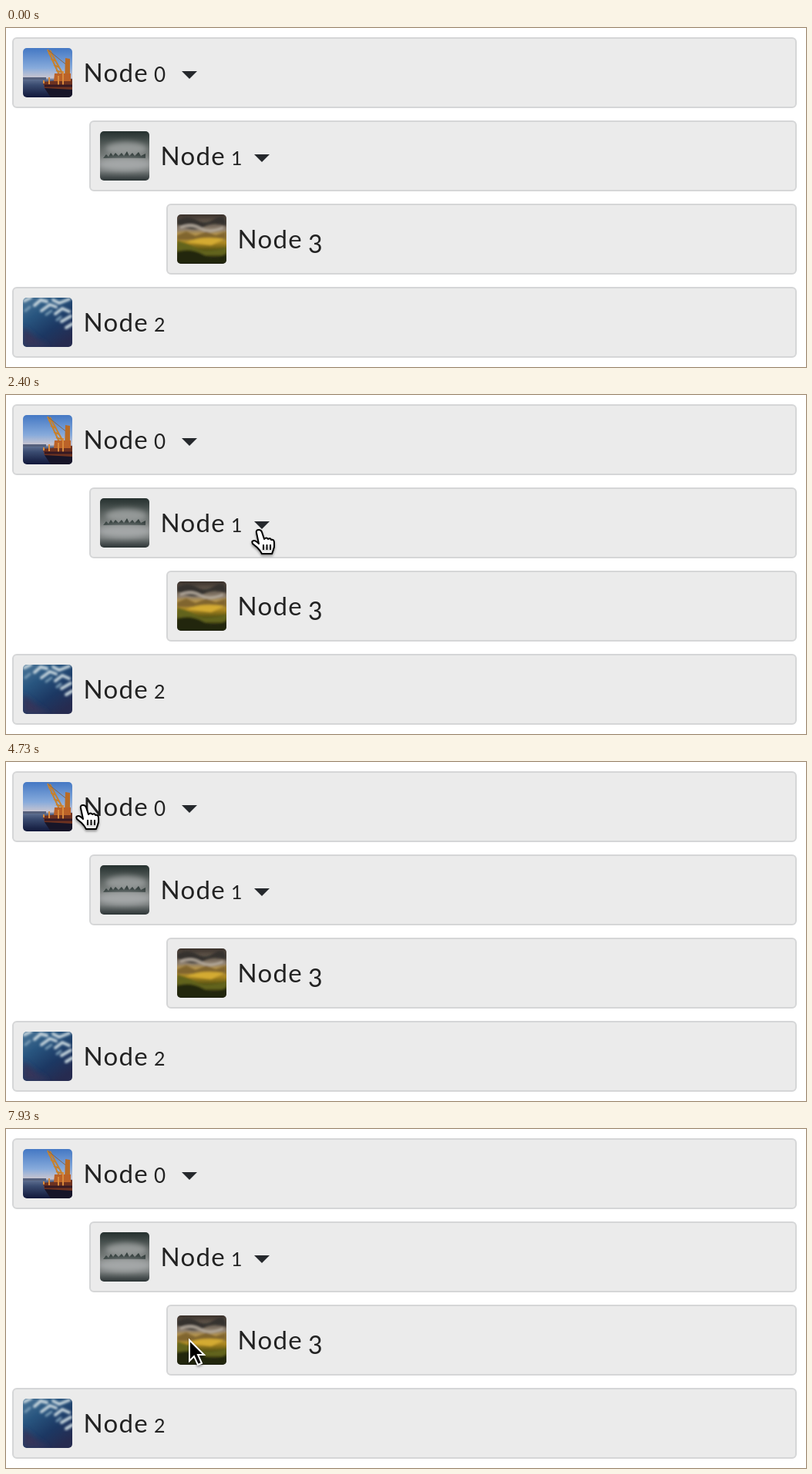
An HTML page that plays this animation: 1038 by 440 pixels, repeating every 8000 ms.

```html
<!DOCTYPE html>
<html lang="en">
<head>
<meta charset="utf-8">
<title>Node tree</title>
<style>
  html, body { margin: 0; width: 100%; height: 100%; overflow: hidden; background: #fff; }
  svg { display: block; }
  .row rect.card { fill: #ebebeb; stroke: #d5d6d7; stroke-width: 2; }
  .name { font: 33px Lato, "Open Sans", sans-serif; letter-spacing: 1.3px; fill: #222; }
  .caret { fill: #25282c; }
  .tip rect { fill: #ececec; stroke: #c4c4c4; filter: drop-shadow(0 2px 3px #0005); }
  .tip text { font: 22px Inter, Roboto, sans-serif; fill: #111; }
  #cursor path { filter: drop-shadow(0 2px 1.5px #0006); }
</style>
</head>
<body>
<svg id="stage" width="1038" height="440" viewBox="0 0 1038 440">
  <defs>
    <clipPath id="thumb"><rect width="64" height="64" rx="5"/></clipPath>
    <filter id="soft"><feGaussianBlur stdDeviation="1.6"/></filter>
    <filter id="fog" x="-30%" y="-50%" width="160%" height="200%"><feGaussianBlur stdDeviation="3.5"/></filter>
    <filter id="edge"><feGaussianBlur stdDeviation=".5"/></filter>

    <linearGradient id="dusk" x2="0" y2="1">
      <stop stop-color="#4478c4"/><stop offset=".4" stop-color="#86aadb"/>
      <stop offset=".6" stop-color="#c8c5d0"/><stop offset=".65" stop-color="#596a8c"/>
      <stop offset=".75" stop-color="#3a4b70"/><stop offset="1" stop-color="#10173a"/>
    </linearGradient>
    <linearGradient id="mist" x2="0" y2="1">
      <stop stop-color="#25302e"/><stop offset=".3" stop-color="#59605e"/>
      <stop offset=".6" stop-color="#858988"/><stop offset=".8" stop-color="#777c7c"/>
      <stop offset="1" stop-color="#2c3435"/>
    </linearGradient>
    <linearGradient id="sea" x2=".7" y2="1">
      <stop stop-color="#4d7799"/><stop offset=".35" stop-color="#28557f"/>
      <stop offset=".7" stop-color="#1c3863"/><stop offset="1" stop-color="#262b50"/>
    </linearGradient>
    <linearGradient id="valley" x2="0" y2="1">
      <stop stop-color="#3a312b"/><stop offset=".3" stop-color="#8b7d6c"/>
      <stop offset=".4" stop-color="#b49450"/><stop offset=".58" stop-color="#a88520"/>
      <stop offset=".75" stop-color="#4c4b12"/><stop offset="1" stop-color="#14180a"/>
    </linearGradient>

    <g id="crane" clip-path="url(#thumb)">
      <rect width="64" height="64" fill="url(#dusk)"/>
      <path d="M0 38H30V41H0Z" fill="#55607c"/>
      <g filter="url(#edge)">
        <path d="M28 52H64V64H36Z" fill="#171528"/>
        <path d="M26 44L64 40V54L28 52Z" fill="#6e3220"/>
        <path d="M32 2L48 37M35 3L53 36M33 7L38 8M36 14L43 17M40 22L47 25M43 29L51 32" fill="none" stroke="#c6812d" stroke-width="2"/>
        <path d="M33 3L58 23" stroke="#866347"/>
        <path d="M55 13L61 14V42H54Z" fill="#b86b26"/>
        <path d="M41 33H62V43H40Z" fill="#bb6228"/>
        <path d="M27 42V46M34 38V47M46 36V48M52 30V49" stroke="#d98a3c" stroke-width="2"/>
        <path d="M28 49H64" stroke="#351923" stroke-width="3"/>
      </g>
    </g>
    <g id="forest" clip-path="url(#thumb)">
      <rect width="64" height="64" fill="url(#mist)"/>
      <ellipse cx="34" cy="23" rx="27" ry="9" fill="#949998" filter="url(#fog)"/>
      <path d="M4 35L8 30L11 33L14 28L17 32L20 28L24 32L28 28L31 32L35 26L38 32L42 28L45 32L50 27L53 32L59 29V35Z" fill="#35403e" filter="url(#edge)"/>
      <ellipse cx="32" cy="43" rx="35" ry="8" fill="#a4a7a8" filter="url(#fog)"/>
    </g>
    <g id="waves" clip-path="url(#thumb)">
      <rect width="64" height="64" fill="url(#sea)"/>
      <path d="M0 64V38Q18 54 34 64Z" fill="#36345a" filter="url(#fog)"/>
      <g fill="none" stroke="#c5d4dc" stroke-linecap="round" stroke-width="4" filter="url(#soft)">
        <path d="M2 4L10 0M15 10L23 3L31 5M24 17L35 9L43 12M39 3L47 7L60 2M42 21L51 14L60 18M50 31L62 24M56 39L64 34"/>
        <path d="M3 17L9 12M30 22L37 17M44 29L49 25" stroke="#7b9db5" stroke-width="3"/>
      </g>
    </g>
    <g id="hills" clip-path="url(#thumb)">
      <rect width="64" height="64" fill="url(#valley)"/>
      <g filter="url(#soft)">
        <path d="M0 7Q14 0 25 7T48 6T64 9V15Q47 9 35 16T0 13Z" fill="#35302d"/>
        <path d="M4 17Q18 11 30 18T60 17" fill="none" stroke="#b7ada0" stroke-width="3"/>
        <path d="M0 27L12 22L24 28L38 22L50 27L64 22V33H0Z" fill="#80652d"/>
        <path d="M12 36Q32 27 62 32L44 40Z" fill="#d4ab32"/>
        <path d="M0 34Q14 38 25 44T64 43V53H0Z" fill="#62631a"/>
        <path d="M0 48Q18 43 34 52T64 50V64H0Z" fill="#20250c"/>
      </g>
    </g>
  </defs>
  <g id="rows"></g>
  <g class="tip" id="tip">
    <rect x=".5" y=".5" width="177" height="34"/>
    <text x="6" y="26">Random Picture</text>
  </g>
  <g id="cursor">
    <g id="hand">
      <path d="M-3 4Q-4 0 0 0Q3 0 4 3L7 12Q10 9 12 12Q15 10 16 13Q20 12 20 17V22Q19 26 17 31H4Q2 27 -2 23L-8 18Q-10 14 -6 14Q-4 14 0 18Z" fill="#fff" stroke="#000" stroke-width="2" stroke-linejoin="round"/>
      <path d="M6 19V26M10.5 19V26M15 19V26" stroke="#000" stroke-width="1.8"/>
    </g>
    <path id="arrow" d="M1 2V29L7 23L12 34L17 32L12 21H20Z" fill="#000" stroke="#fff" stroke-width="2"/>
  </g>
  <circle id="press" r="61" cx="228.5" cy="62" fill="none" stroke="#000" stroke-width="2.6"/>
</svg>
<script>
const LOOP = 8000;
const $ = id => document.getElementById(id);
const show = (el, on) => el.setAttribute('display', on ? 'inline' : 'none');
const place = (el, x, y) => el.setAttribute('transform', `translate(${x} ${y})`);
const within = (t, spans) => spans.some(([from, to]) => t >= from && t < to);

// Old-style figures: size and drop below the baseline
const nodes = [
  { label: 0, x: 8, pic: 'crane', size: 26, drop: 0, caret: 230 },
  { label: 1, x: 108, pic: 'forest', size: 25, drop: 0, caret: 224 },
  { label: 3, x: 208, pic: 'hills', size: 32, drop: 6 },
  { label: 2, x: 8, pic: 'waves', size: 25, drop: 0 },
];

$('rows').innerHTML = nodes.map(n => `
  <g class="row">
    <rect class="card" x="1" y="1" width="${1022 - n.x + 8 - 8 + 8 - 6}" height="90" rx="5"/>
    <use href="#${n.pic}" x="14" y="14"/>
    <text class="name" x="92.5" y="58">Node <tspan x="184" dy="${n.drop}" font-size="${n.size}" style="font-size:${n.size}px">${n.label}</tspan></text>
    ${n.caret ? '<path class="caret"/>' : ''}
  </g>`).join('');
nodes.forEach((n, i) => {
  n.el = $('rows').children[i];
  n.arrow = n.el.querySelector('.caret');
});

const closed0 = [[1200, 1960]];
const closed1 = [[2850, 3465]];
const presses = [[1070, 1200], [1850, 1960], [2740, 2850], [3370, 3465]];
const tips = [{ from: 5500, to: 6180, x: 60, y: 92 }, { from: 6800, to: 7450, x: 250, y: 308 }];

// time, x, y of the pointer's hot spot
const route = [
  [380, 262, 17], [700, 231, 62], [1050, 228, 62], [2020, 228, 62],
  [2380, 328, 175], [2700, 330, 176], [3800, 330, 176], [4730, 100, 56],
  [4950, 58, 54], [5850, 58, 54], [6070, 98, 94], [6500, 250, 270],
  [7450, 250, 270], [7700, 237, 272], [LOOP, 237, 272],
];

function pointerAt(t) {
  const i = Math.max(1, route.findIndex(p => p[0] > t));
  const [a, b] = [route[i - 1], route[i]];
  const k = Math.min(1, Math.max(0, (t - a[0]) / (b[0] - a[0])));
  const e = k * k * (3 - 2 * k);
  return [a[1] + (b[1] - a[1]) * e, a[2] + (b[2] - a[2]) * e];
}

function layout(t) {
  const shut0 = within(t, closed0), shut1 = within(t, closed1);
  const hidden = [false, shut0, shut0 || shut1, false];
  let y = 12;
  nodes.forEach((n, i) => {
    show(n.el, !hidden[i]);
    if (hidden[i]) return;
    n.y = y;
    place(n.el, n.x, y);
    if (n.arrow) {
      const shut = i ? shut1 : shut0, c = n.caret;
      n.arrow.setAttribute('d', shut
        ? `M${c - 5} 37V57L${c + 6} 47Z`
        : `M${c - 10} 44H${c + 10}L${c} 54Z`);
    }
    y += 108;
  });
  return nodes.filter((n, i) => !hidden[i]);
}

function draw(t) {
  const visible = layout(t);
  const [x, y] = pointerAt(t);
  const overName = visible.some(n => n.caret && x > n.x + 80 && x < n.x + n.caret + 14 && y > n.y + 14 && y < n.y + 79);
  show($('cursor'), t >= route[0][0]);
  place($('cursor'), x, y);
  show($('hand'), overName);
  show($('arrow'), !overName);

  show($('press'), within(t, presses));
  place($('press'), x - 228, y - 62);

  const tip = tips.find(p => t >= p.from && t < p.to);
  show($('tip'), tip);
  if (tip) place($('tip'), tip.x, tip.y);
}

let start;
function tick(now) {
  start ??= now;
  draw((now - start) % LOOP);
  requestAnimationFrame(tick);
}
draw(0);
requestAnimationFrame(tick);
</script>
</body>
</html>
```
